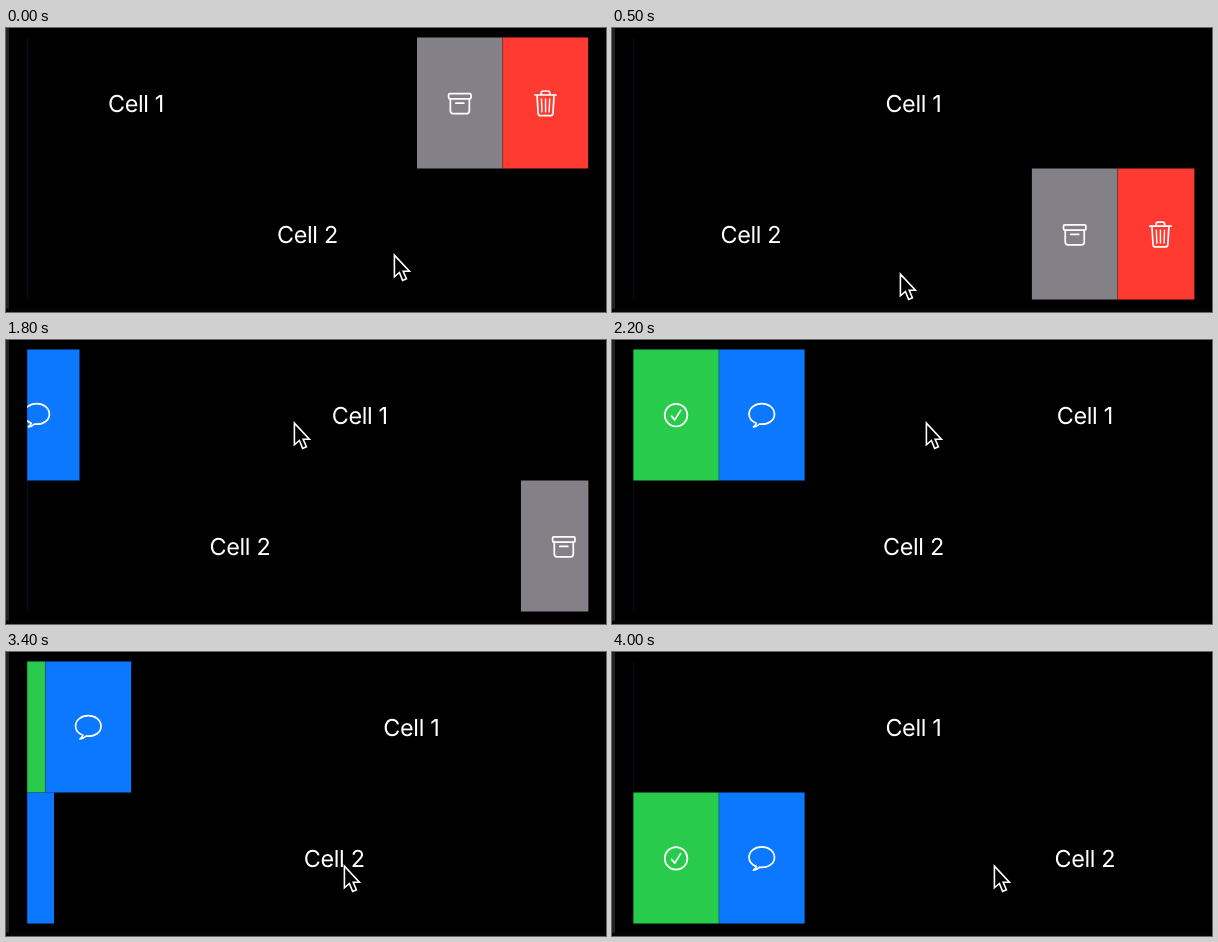
These frames come from a looping animation (600 by 284 pixels, 4.8 s). An HTML page:

```html
<!DOCTYPE html>
<html lang="en">
<head>
<meta charset="utf-8">
<title>Swipe actions</title>
<style>
  html, body { margin: 0; width: 100%; height: 100%; overflow: hidden; background: #000; }
  svg { display: block; width: 600px; height: 284px; }
  text { font: 400 23.4px Inter, Roboto, sans-serif; letter-spacing: -.35px; fill: #fff;
         text-anchor: middle; text-rendering: geometricPrecision; }
  .icon { fill: none; stroke: #fff; stroke-width: 1.7; stroke-linecap: round; stroke-linejoin: round; }
</style>
</head>
<body>
<svg viewBox="0 0 600 284">
  <defs>
    <clipPath id="list"><rect x="21.2" y="9.3" width="561.2" height="262.4"/></clipPath>
    <g id="archive" class="icon">
      <rect x="-11.2" y="-9.5" width="22.4" height="5.2" rx="1.4"/>
      <path d="M-9.5-4.3V7.6Q-9.5 10.4-6.7 10.4H6.7Q9.5 10.4 9.5 7.6V-4.3M-4 0H4"/>
    </g>
    <g id="trash" class="icon">
      <path d="M-10.6-8.2H10.6M-4.2-8.4V-10.4Q-4.2-12.2-2.5-12.2H2.5Q4.2-12.2 4.2-10.4V-8.4"/>
      <path d="M-8.5-8L-7.4 10.2Q-7.2 12.5-4.9 12.5H4.9Q7.2 12.5 7.4 10.2L8.5-8"/>
      <path stroke-width="1.4" d="M-4.1-4.2L-3.6 8.7M0-4.2V8.7M4.1-4.2L3.6 8.7"/>
    </g>
    <g id="check" class="icon">
      <circle r="11.3"/>
      <path d="M-4.5 .9L-1.3 4.7L4.6-4.8"/>
    </g>
    <g id="bubble" class="icon">
      <path d="M-5.4 8C-10 6.2-12.7 3-12.7-1C-12.7-7-7-11.5 0-11.5S12.7-7 12.7-1S7 9 0 9Q-1.2 9-2.2 8.8C-4 10.6-6 11.8-8.2 11.8C-6.8 10.6-5.8 9.4-5.4 8Z"/>
    </g>
  </defs>
  <rect width="600" height="284"/>
  <rect width="3" height="284" fill="#222"/>
  <rect y="280.5" width="600" height="3.5" fill="#070205"/>
  <g id="rows"></g>
  <path id="cursor" stroke="#fff" stroke-width="1.6"
        d="M.4 1.1V22.8L5.4 18.5L8.6 26.4L12.4 24.8L9.2 17.2H15.4Z"/>
</svg>
<script>
const LOOP = 4800, STEP = 100, LAST = 4000;
const LEFT = 21.2, RIGHT = 582.4, TOP = 9.3, ROW = 131.2, OPEN = 171.4, ACTION = OPEN / 2;

// Eased progress from 0 to 1 between two times
function ease(t, from, to) {
  const p = Math.min(1, Math.max(0, (t - from) / (to - from)));
  return p * p * (3 - 2 * p);
}

// How far each row is pulled: -1 shows the trailing actions, 1 the leading ones
const pulls = [
  t => ease(t, 0, 500) - 1 + ease(t, 1600, 2145) - ease(t, 3250, 3600),
  t => ease(t, 1600, 1950) - ease(t, 0, 580) + ease(t, 3200, 4000)
];

const stops = [
  { t: 0, x: 388, y: 226 },
  { t: 500, x: 288, y: 245 },
  { t: 1100, x: 117, y: 70 },
  { t: 1400, x: 186, y: 87 },
  { t: 1800, x: 288, y: 82 },
  { t: 2000, x: 314, y: 82 },
  { t: 2200, x: 314, y: 82 },
  { t: 2700, x: 254, y: 228 },
  { t: 3200, x: 296, y: 217 },
  { t: 3400, x: 338, y: 213 },
  { t: 3700, x: 382, y: 213 }
];

function pointerAt(t) {
  const i = stops.findIndex(s => s.t > t);
  if (i < 0) return stops[stops.length - 1];
  const a = stops[i - 1], b = stops[i], p = (t - a.t) / (b.t - a.t);
  return { x: a.x + (b.x - a.x) * p, y: a.y + (b.y - a.y) * p };
}

function action(index, color, icon) {
  const x = index * ACTION;
  return `<rect x="${x}" width="${ACTION}" height="${ROW}" fill="${color}"/>
    <use href="#${icon}" x="${x + ACTION / 2}" y="65.9"/>`;
}

const seam = `<rect x="${ACTION - .5}" width="1" height="${ROW}" opacity=".2"/>`;

const rowsEl = document.getElementById('rows');
const cursor = document.getElementById('cursor');

rowsEl.innerHTML = pulls.map((_, i) => `
  <text y="${TOP + i * ROW + 74.7}">Cell ${i + 1}</text>
  <g clip-path="url(#list)">
    <g class="lead">${action(0, '#28cb4b', 'check')}${action(1, '#0b78ff', 'bubble')}${seam}</g>
    <g class="trail">${action(0, '#848087', 'archive')}${action(1, '#ff3b31', 'trash')}${seam}</g>
  </g>`).join('');

const all = sel => [...rowsEl.querySelectorAll(sel)];
const labels = all('text'), leads = all('.lead'), trails = all('.trail');

function move(el, x, y) {
  el.setAttribute('transform', `translate(${x} ${y})`);
}

function draw(ms) {
  const t = Math.min(LAST, Math.floor(ms % LOOP / STEP) * STEP);
  pulls.forEach((pull, i) => {
    const dx = OPEN * pull(t), y = TOP + i * ROW;
    labels[i].setAttribute('x', 301.4 + dx);
    move(leads[i], LEFT + Math.max(dx, 0) - OPEN, y);
    move(trails[i], RIGHT + Math.min(dx, 0), y);
  });
  const { x, y } = pointerAt(t);
  move(cursor, x, y);
}

const start = performance.now();
function tick() {
  draw(performance.now() - start);
  requestAnimationFrame(tick);
}
tick();
</script>
</body>
</html>
```
